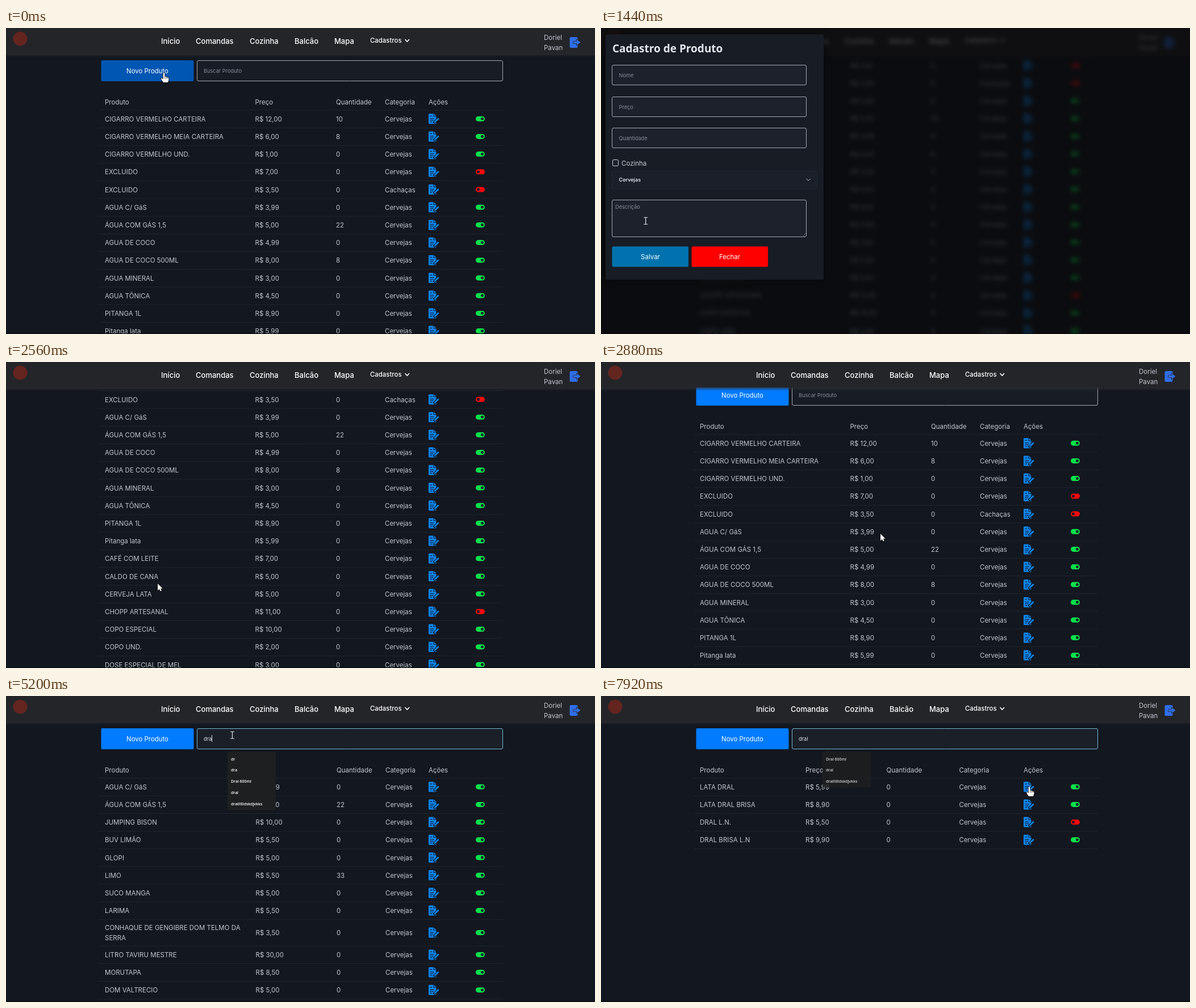
These frames come from a looping animation (1037 px wide and 540 px high, 8 s). An HTML page with a canvas:

```html
<!DOCTYPE html>
<html lang="pt-BR">
<head>
<meta charset="utf-8">
<title>Cadastro de produtos</title>
<style>
html, body { margin: 0; width: 100%; height: 100%; overflow: hidden; background: #13171f; }
canvas { display: block; }
</style>
</head>
<body>
<canvas id="stage" width="1037" height="540"></canvas>
<script>
const W = 1037, H = 540, LOOP = 8000, STEP = 80;
const BG = '#13171f', INK = '#c2c7d0', BLUE = '#0d86f0', HINT = '#858c9b', EDGE = '#a3a9b4';
const INTER = 'Inter, sans-serif', OPEN = '"Open Sans", sans-serif';
const stage = document.getElementById('stage').getContext('2d');
const buffer = document.createElement('canvas');
buffer.width = W;
buffer.height = H;
const back = buffer.getContext('2d');

// Rows: name | price | quantity | flags (c = Cachaças, x = disabled)
const parse = list => list.trim().split('\n').map(line => {
  const [name, price, qty, flags = ''] = line.trim().split('|');
  return { name: name.split('/n'), price, qty, kind: flags.includes('c') ? 'Cachaças' : 'Cervejas', on: !flags.includes('x') };
});
const TABLES = {
  all: { cols: [174, 438.5, 581, 667], rows: parse(`
    CIGARRO VERMELHO CARTEIRA|12,00|10
    CIGARRO VERMELHO MEIA CARTEIRA|6,00|8
    CIGARRO VERMELHO UND.|1,00|0
    EXCLUIDO|7,00|0|x
    EXCLUIDO|3,50|0|cx
    AGUA C/ GáS|3,99|0
    ÁGUA COM GÁS 1,5|5,00|22
    AGUA DE COCO|4,99|0
    AGUA DE COCO 500ML|8,00|8
    AGUA MINERAL|3,00|0
    AGUA TÔNICA|4,50|0
    PITANGA 1L|8,90|0
    Pitanga lata|5,99|0
    CAFÉ COM LEITE|7,00|0
    CALDO DE CANA|5,00|0
    CERVEJA LATA|5,00|0
    CHOPP ARTESANAL|11,00|0|x
    COPO ESPECIAL|10,00|0
    COPO UND.|2,00|0
    DOSE ESPECIAL DE MEL|3,00|0
    ESPETINHO|6,00|0
    FAROFA|4,00|0`) },
  partial: { cols: [174, 439.5, 582, 668], rows: parse(`
    AGUA C/ GáS|3,99|0
    ÁGUA COM GÁS 1,5|5,00|22
    JUMPING BISON|10,00|0
    BUV LIMÃO|5,50|0
    GLOPI|5,00|0
    LIMO|5,50|33
    SUCO MANGA|5,00|0
    LARIMA|5,50|0
    CONHAQUE DE GENGIBRE DOM TELMO DA/nSERRA|3,50|0
    LITRO TAVIRU MESTRE|30,00|0
    MORUTAPA|8,50|0
    DOM VALTRECIO|5,00|0`) },
  found: { cols: [174, 360, 502.5, 630.5], rows: parse(`
    LATA DRAL|5,99|0
    LATA DRAL BRISA|8,90|0
    DRAL L.N.|5,50|0|x
    DRAL BRISA L.N|9,90|0`) }
};

const LONG = 'dralllllldskdjvkks';
const POPUPS = {
  first: { w: 60, items: ['dr', 'dra', 'dose', 'dral', 'doce'] },
  dr: { w: 85, items: ['dr', 'dra', 'Dral 600ml', 'dral', LONG] },
  dra: { w: 85, items: ['dra', 'Dral 600ml', 'dral', LONG] },
  dral: { w: 85, items: ['Dral 600ml', 'dral', LONG] }
};

// Stepped tracks: [start time, value]
const TABLE = [[0, 'all'], [5200, 'partial'], [5360, 'found']];
const TYPED = [[0, ''], [4800, 'd'], [5200, 'dra'], [5600, 'dral']];
const POPUP = [[0, ''], [4880, 'first'], [5200, 'dr'], [5280, 'dra'], [5680, 'dral']];
const HOVER = [[0, -1], [6400, 0], [6640, 1], [6960, 2], [7920, -1]];
// Interpolated tracks: [time, ...values]
const SCROLL = [[0, 0], [960, 0], [1520, 219], [2560, 219], [2720, 110], [2880, 17], [3040, 0]];
const POINTER = [[0, 277, 78], [160, 278.5, 78], [720, 278.5, 78], [1120, 140, 225], [1600, 48, 398],
  [1680, 48, 398], [2320, 239, 402], [2520, 239, 402], [2880, 492, 303], [3120, 492, 303],
  [3400, 736, 62], [3760, 272, 426], [3860, 272, 426], [4080, 398.5, 69], [5920, 398.5, 69],
  [6400, 412, 112], [6640, 430, 131], [6800, 434, 147], [6880, 434, 147], [7680, 753, 159]];

const stepAt = (track, t) => track.filter(k => k[0] <= t).pop()[1];
function tween(track, t) {
  const i = track.findIndex(k => k[0] > t);
  if (i < 0) return track[track.length - 1].slice(1);
  const [a, b] = [track[i - 1], track[i]];
  const u = (t - a[0]) / (b[0] - a[0]);
  return a.slice(1).map((v, j) => v + (b[j + 1] - v) * u);
}
const inside = (x, y, l, t, r, b) => x >= l && x <= r && y >= t && y <= b;

// y is the middle of the capitals
function text(g, s, x, y, size = 11.5, color = INK, weight = 400, family = INTER, align = 'left') {
  g.font = `${weight} ${size}px ${family}`;
  g.fillStyle = color;
  g.textAlign = align;
  g.fillText(s, x, y + size * 0.4);
}
function box(g, x, y, w, h, r, fill, stroke) {
  g.beginPath();
  g.roundRect(x, y, w, h, r);
  if (fill) { g.fillStyle = fill; g.fill(); }
  if (stroke) { g.strokeStyle = stroke; g.lineWidth = 1; g.stroke(); }
}
function line(g, points, color, width) {
  g.beginPath();
  points.forEach(p => g.lineTo(...p));
  g.strokeStyle = color;
  g.lineWidth = width;
  g.stroke();
}
function poly(g, points, fill) {
  g.beginPath();
  points.forEach(p => g.lineTo(...p));
  g.closePath();
  g.fillStyle = fill;
  g.fill();
}
function dot(g, x, y, r, fill) {
  g.beginPath();
  g.arc(x, y, r, 0, Math.PI * 2);
  g.fillStyle = fill;
  g.fill();
}

function editIcon(g, cy) {
  g.save();
  g.translate(744, cy - 9);
  poly(g, [[1, 0], [8.5, 0], [8.5, 5], [13.5, 5], [13.5, 17], [12.5, 18], [1, 18], [0, 17], [0, 1]], BLUE);
  poly(g, [[9.5, 0], [13.5, 4], [9.5, 4]], BLUE);
  for (const [y, end] of [[4, 6], [8.5, 9.5], [11.5, 8.5], [14.5, 6]]) line(g, [[2.5, y], [end, y]], BG, 1.1);
  line(g, [[9, 16.5], [17, 8.5]], BG, 4.6);
  line(g, [[11, 14.5], [17.7, 8.2]], BLUE, 2.7);
  poly(g, [[9.4, 16.2], [10, 13.6], [12, 15.6]], BLUE);
  g.restore();
}
function toggle(g, cy, on) {
  box(g, 827, cy - 4.5, 16, 9, 4.5, on ? '#0be04c' : '#f20a0d');
  dot(g, on ? 838.5 : 831.5, cy, 2.4, BG);
}

function drawTable(g, { cols, rows }, top) {
  const rule = y => line(g, [[163, y], [875, y]], '#1f2530', 1);
  ['Produto', 'Preço', 'Quantidade', 'Categoria'].forEach((s, i) => text(g, s, cols[i], top + 130));
  text(g, 'Ações', 744, top + 130);
  let y = top + 145;
  rule(y);
  for (const row of rows) {
    const h = row.name.length > 1 ? 46.6 : 31.2, cy = y + h / 2 - 0.4;
    row.name.forEach((s, i) => text(g, s, cols[0], cy + (i - (row.name.length - 1) / 2) * 17.4));
    text(g, 'R$ ' + row.price, cols[1], cy);
    text(g, row.qty, cols[2], cy);
    text(g, row.kind, cols[3], cy);
    editIcon(g, cy);
    toggle(g, cy, row.on);
    y += h;
    rule(y);
  }
}

function drawSearch(g, t, top) {
  const focused = t >= 4080, typed = stepAt(TYPED, t), hover = stepAt(HOVER, t);
  box(g, 336.5, top + 57.5, 538, 36, 2.5, focused ? '#1a1f28' : '#181c25', focused ? '#75b9d5' : EDGE);
  const cy = top + 75;
  if (hover >= 0) text(g, POPUPS.dral.items[hover], 348, cy, 6.9, '#e4e7ed', 600, OPEN);
  else if (typed) text(g, typed, 348, cy, 9.2, '#e0e3e7');
  else text(g, 'Buscar Produto', 348, cy, 9.2, HINT);
  const caret = (t >= 4080 && t < 4480) || (t >= 4800 && t < 5600);
  if (caret) {
    g.font = `400 9.2px ${INTER}`;
    g.fillStyle = '#e0e3e7';
    g.fillRect(348 + Math.round(g.measureText(typed).width), cy - 6, 1, 12);
  }
}

function drawHeader(g) {
  const shade = g.createLinearGradient(0, 45, 0, 51);
  shade.addColorStop(0, 'rgba(48,49,53,.75)');
  shade.addColorStop(1, 'rgba(48,49,53,0)');
  g.fillStyle = shade;
  g.fillRect(0, 45, W, 6);
  g.fillStyle = '#242529';
  g.fillRect(0, 0, W, 45);
  dot(g, 25, 19, 12.5, '#64251f');
  [['Início', 273], ['Comandas', 334], ['Cozinha', 429], ['Balcão', 508], ['Mapa', 578]]
    .forEach(([s, x]) => text(g, s, x, 22.5, 13, '#fff', 500));
  text(g, 'Cadastros', 641, 21.5, 11.4, '#fff', 500);
  line(g, [[702.5, 20], [706.3, 24], [710, 20]], '#fff', 1.6);
  text(g, 'Doriel', 947, 16.5);
  text(g, 'Pavan', 947, 34);
  box(g, 992.5, 16, 14, 19, 2.5, '#2f6eea');
  const arrow = [[999, 23.5], [1005, 23.5], [1005, 20.5], [1011.5, 25.3], [1005, 30], [1005, 27], [999, 27]];
  line(g, [...arrow, arrow[0]], '#242529', 1.6);
  poly(g, arrow, '#2f6eea');
}

function drawPage(g, t, hot) {
  const top = -tween(SCROLL, t)[0];
  g.fillStyle = BG;
  g.fillRect(0, 0, W, H);
  box(g, 167.5, top + 57, 163, 37, 2.5, hot ? '#0056b3' : '#017bff');
  text(g, 'Novo Produto', 249, top + 75.5, 11.4, '#fff', 400, INTER, 'center');
  drawSearch(g, t, top);
  drawTable(g, TABLES[stepAt(TABLE, t)], top);
  drawHeader(g);
  g.fillStyle = 'rgba(0,0,0,.35)';
  g.fillRect(0, 538, W, 2);
}

function drawModal(g) {
  g.filter = 'blur(3.8px)';
  g.drawImage(buffer, 0, 0);
  g.filter = 'none';
  g.fillStyle = 'rgba(8,9,10,.75)';
  g.fillRect(0, 0, W, H);
  g.save();
  g.shadowColor = 'rgba(0,0,0,.5)';
  g.shadowBlur = 12;
  box(g, 8, 11, 384, 433, 2.5, '#181c25');
  g.restore();
  text(g, 'Cadastro de Produto', 20, 35, 19, '#e3e6eb', 700, '"Noto Sans", sans-serif');
  const field = (y, h) => box(g, 19.5, y + 0.5, 342, h, 2.5, '#1c212c', EDGE);
  [['Nome', 65], ['Preço', 121], ['Quantidade', 176]].forEach(([s, y]) => {
    field(y, 35);
    text(g, s, 31.5, y + 18, 9.2, HINT);
  });
  box(g, 20.5, 232.5, 10, 11, 2, '#1c212c', '#d3d7df');
  text(g, 'Cozinha', 36, 238);
  box(g, 19.5, 252.5, 361, 31, 2.5, '#1a1f29', '#222834');
  text(g, 'Cervejas', 31.5, 267.5, 9, '#e0e3e7', 600);
  line(g, [[361.5, 266], [365, 269.5], [368.5, 266]], INK, 1);
  field(303, 65);
  text(g, 'Descrição', 25, 315, 9.2, HINT);
  line(g, [[356, 367], [361, 362]], '#8b909a', 0.8);
  box(g, 19.5, 385.5, 134.5, 36, 2.5, '#0172ad');
  box(g, 159.5, 385.5, 134.5, 36, 2.5, '#ff0000');
  text(g, 'Salvar', 87, 403.5, 11.5, '#fff', 400, INTER, 'center');
  text(g, 'Fechar', 226.5, 403.5, 11.5, '#fff', 400, INTER, 'center');
}

function drawPopup(g, t) {
  const popup = POPUPS[stepAt(POPUP, t)];
  if (!popup) return;
  const hover = stepAt(HOVER, t), pitch = 19.7;
  g.save();
  if (t >= 7920) g.globalAlpha = 0.8;
  poly(g, [[396.5, 99], [401, 95], [405.5, 99]], '#1e1f20');
  box(g, 390, 98.5, popup.w, popup.items.length * pitch + 4, 3, '#1e1f20');
  popup.items.forEach((s, i) => {
    const y = 111 + i * pitch;
    if (i === hover) {
      box(g, 392, y - 9.8, popup.w - 4, 19.4, 2, '#3c3d3e');
      line(g, [[461, y - 2.3], [465.5, y + 2.2]], '#e8e8e8', 1);
      line(g, [[465.5, y - 2.3], [461, y + 2.2]], '#e8e8e8', 1);
    }
    if (popup !== POPUPS.first || i < 4 || t >= 5040) text(g, s, 396, y, 6.9, '#fff', 600, OPEN);
  });
  g.restore();
}

function cursorKind(x, y, modal) {
  if (modal) {
    if (inside(x, y, 20, 386, 154, 421) || inside(x, y, 160, 386, 294, 421)) return 'hand';
    const inField = [[65, 101], [121, 157], [177, 212], [304, 369]].some(([a, b]) => inside(x, y, 20, a, 362, b));
    return inField ? 'beam' : 'arrow';
  }
  if (inside(x, y, 168, 57, 330, 94) || inside(x, y, 744, 151, 762, 263)) return 'hand';
  return inside(x, y, 336, 57, 875, 94) ? 'beam' : 'arrow';
}
function drawCursor(g, x, y, kind) {
  g.save();
  g.translate(x, y);
  g.lineJoin = 'round';
  if (kind === 'beam') {
    const serif = y => line(g, [[-3.5, y], [3.5, y]], '#e6e6e6', 1);
    line(g, [[0, -6], [0, 6]], '#e6e6e6', 1.2);
    serif(-6);
    serif(6);
  } else {
    const shape = new Path2D(kind === 'hand'
      ? 'M-.3 2Q1 .2 2.4 2V8L4.5 7.6 5.2 8.5 7 8.4 7.8 9.4 9.4 9.8V14L8 18H0L-3.7 12.5Q-4.4 10.4-2.5 10.6L-.3 12.4Z'
      : 'M0 0V12.2L2.8 9.7 4.7 13.6 6.8 12.6 5 8.8H8.6Z');
    g.fillStyle = '#fff';
    g.strokeStyle = '#000';
    g.lineWidth = 1.4;
    g.stroke(shape);
    g.fill(shape);
    if (kind === 'hand') [2.4, 4.8, 7.2].forEach(cx => line(g, [[cx, 8.5], [cx, 11.5]], '#000', 0.7));
  }
  g.restore();
}

function render(t) {
  const modal = t >= 80 && t < 2480;
  const [x, y] = tween(POINTER, t);
  const kind = cursorKind(x, y, modal);
  drawPage(back, t, !modal && inside(x, y, 168, 57, 330, 94));
  stage.drawImage(buffer, 0, 0);
  if (modal) drawModal(stage);
  drawPopup(stage, t);
  drawCursor(stage, x, y, kind);
}

let shown = -1;
const start = performance.now();
function tick(now) {
  const t = Math.floor((Math.max(0, now - start) % LOOP) / STEP) * STEP;
  if (t !== shown) render(shown = t);
  requestAnimationFrame(tick);
}
render(0);
requestAnimationFrame(tick);
</script>
</body>
</html>
```
